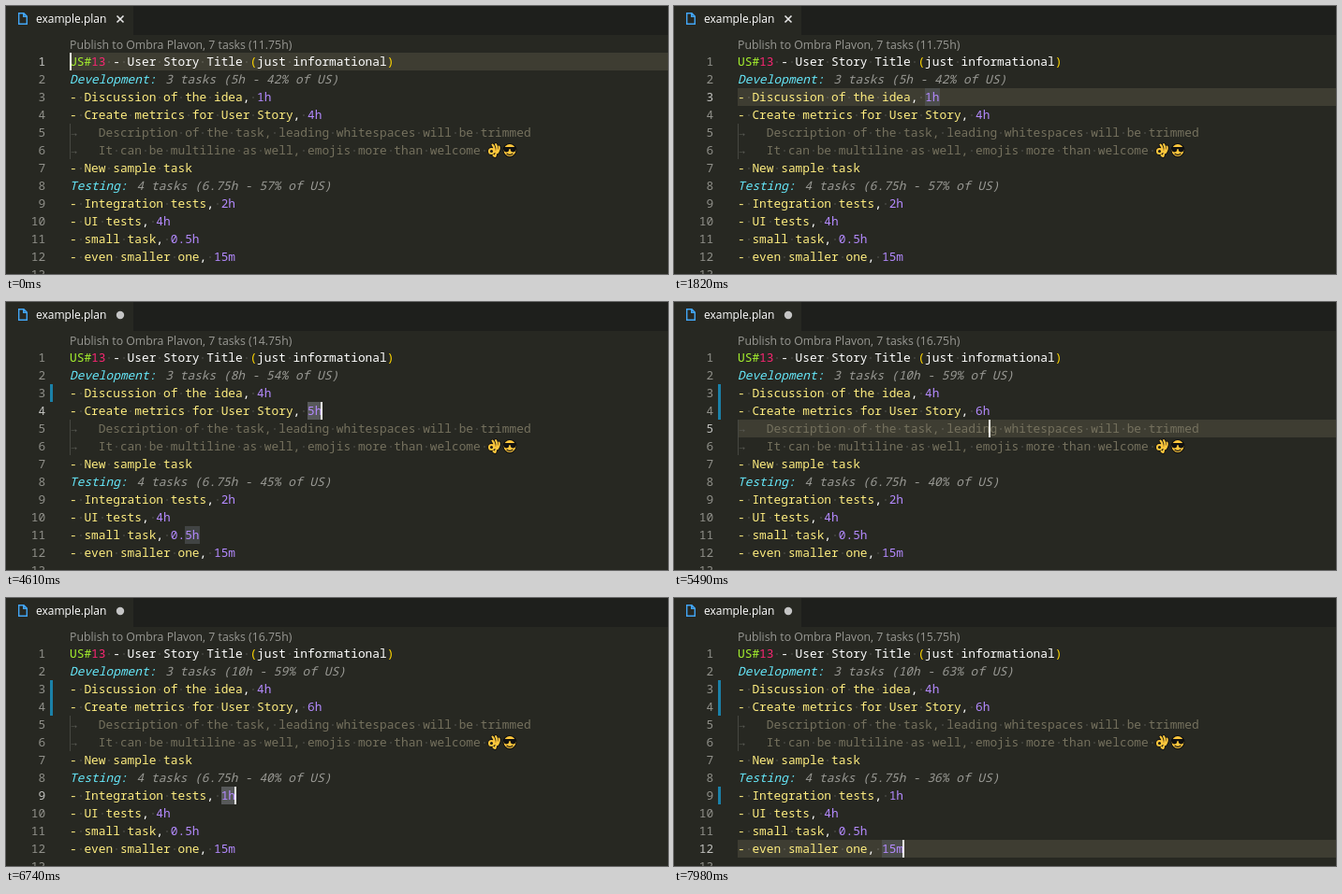
Write an HTML page with a canvas that moves like this. It is 707 by 287 pixels and loops after 8000 ms.

```html
<!DOCTYPE html>
<html lang="en">
<head>
<meta charset="utf-8">
<title>example.plan</title>
<style>
  html, body { margin: 0; width: 100%; height: 100%; overflow: hidden; background: #272822; }
  canvas { display: block; }
</style>
</head>
<body>
<canvas id="stage" width="707" height="287"></canvas>
<script>
const ctx = document.getElementById('stage').getContext('2d');
const LOOP = 8000, LEFT = 68, TOP = 50, CHAR = 7.697, ROW = 19;
const MONO = '12.83px "Noto Sans Mono", monospace';
const UI = '"Open Sans", "Noto Sans", sans-serif';
const COLOR = {
  back: '#272822', bar: '#1e1f1c', line: '#3e3d32', white: '#ffffff', yellow: '#ffee80',
  purple: '#b48aff', green: '#a6f22e', pink: '#f92672', cyan: '#66e8fa', gold: '#ffd700',
  note: '#75715e', hint: '#999994', space: 'rgba(255,255,255,.1)', guide: '#464741',
  arrow: '#5a5b55', modified: '#1b81a8', selection: '#57595a', word: 'rgba(87,91,97,.55)'
};

// row / want: caret line and preferred column; mark: highlighted word
const START = {
  row: 1, want: 0, caret: true, selecting: false, mark: '', dirty: false, changed: [],
  idea: 1, metrics: 4, integration: 2, dev: 5, test: 6.75, total: 11.75
};
const STEPS = [
  [500, { caret: false }],
  [620, { row: 2, caret: true }],
  [820, { row: 3 }],
  [1320, { want: 28 }],
  [1570, { mark: '1h' }],
  [1820, { caret: false }],
  [2250, { idea: 2, selecting: true, caret: true, mark: '2h' }],
  [2370, { idea: 3 }],
  [2440, { dirty: true }],
  [2620, { changed: [3], dev: 6 }],
  [2750, { dev: 7, caret: false }],
  [3000, { idea: 4 }],
  [3250, { total: 13.75, caret: true }],
  [3380, { dev: 8 }],
  [3430, { row: 4, selecting: false, mark: '' }],
  [3680, { mark: 'Story' }],
  [3750, { total: 14.75 }],
  [3820, { want: 35, mark: '' }],
  [4070, { mark: '4h' }],
  [4320, { caret: false }],
  [4610, { metrics: 5, selecting: true, caret: true, mark: '5h' }],
  [4740, { metrics: 6 }],
  [4990, { changed: [3, 4], dev: 9 }],
  [5120, { dev: 10, caret: false }],
  [5370, { row: 5, selecting: false, caret: true, mark: '' }],
  [5420, { total: 16.75 }],
  [5500, { row: 6 }],
  [5620, { row: 7 }],
  [5750, { row: 8 }],
  [5880, { row: 9 }],
  [6130, { mark: '2h' }],
  [6360, { caret: false }],
  [6740, { integration: 1, selecting: true, caret: true, mark: '' }],
  [6920, { changed: [3, 4, 9] }],
  [7050, { test: 5.75 }],
  [7230, { caret: false }],
  [7480, { row: 10, selecting: false, caret: true, total: 15.75 }],
  [7600, { row: 11 }],
  [7730, { row: 12 }],
  [7980, { mark: '15m' }]
];

const stateAt = time => Object.assign({}, START, ...STEPS.filter(s => s[0] <= time).map(s => s[1]));
const rowY = row => TOP + (row - 1) * ROW;
const colX = col => Math.round(LEFT + col * CHAR);

const documentLines = s => [
  'US#13 - User Story Title (just informational)',
  'Development:',
  `- Discussion of the idea, ${s.idea}h`,
  `- Create metrics for User Story, ${s.metrics}h`,
  '    Description of the task, leading whitespaces will be trimmed',
  '    It can be multiline as well, emojis more than welcome ',
  '- New sample task',
  'Testing:',
  `- Integration tests, ${s.integration}h`,
  '- UI tests, 4h',
  '- small task, 0.5h',
  '- even smaller one, 15m',
  ''
];

function fill(color, x, y, w, h) {
  ctx.fillStyle = color;
  ctx.fillRect(x, y, w, h);
}

function label(text, x, y, font, color) {
  ctx.font = `${font} ${UI}`;
  ctx.fillStyle = color;
  ctx.fillText(text, x, y);
}

function highlight(color, row, col, length) {
  fill(color, colX(col), rowY(row), colX(col + length) - colX(col), ROW);
}

// Places each character on the editor's column grid.
function code(text, row, col, colorAt, style = '') {
  ctx.font = `${style} ${MONO}`;
  [...text].forEach((char, i) => {
    ctx.fillStyle = colorAt(i, char);
    ctx.fillText(char, LEFT + (col + i) * CHAR, rowY(row) + 14);
  });
}

function colorsFor(text, row) {
  if (row === 1) {
    return (i, c) => i < 3 ? COLOR.green : i < 5 ? COLOR.pink : '()'.includes(c) ? COLOR.gold : COLOR.white;
  }
  if (text.endsWith(':')) return () => COLOR.cyan;
  if (text.startsWith(' ')) return () => COLOR.note;
  const comma = text.indexOf(',');
  return i => comma < 0 || i < comma ? COLOR.yellow : i === comma ? COLOR.white : COLOR.purple;
}

function drawLine(text, row) {
  const indented = text.startsWith(' ');
  const style = indented ? '' : text.endsWith(':') ? 'italic 500' : '500';
  code(text, row, 0, colorsFor(text, row), style);
  [...text].forEach((char, i) => {
    if (char === ' ' && !(indented && i < 4)) {
      fill(COLOR.space, colX(i + 0.5) - 1, rowY(row) + 9, 2, 2);
    }
  });
  if (indented) {
    fill(COLOR.guide, LEFT, rowY(row), 1, ROW);
    code('→', row, 0.1, () => COLOR.arrow);
  }
}

function summary(row, heading, tasks, hours, total) {
  const share = Math.floor(hours / total * 100);
  const margin = 10 / CHAR;
  code(`${tasks} tasks (${hours}h - ${share}% of US)`, row, heading.length + margin, () => COLOR.hint, 'italic');
}

function stroke(color, width, path) {
  ctx.strokeStyle = color;
  ctx.lineWidth = width;
  ctx.stroke(new Path2D(path));
}

function disc(color, x, y, r) {
  ctx.fillStyle = color;
  ctx.beginPath();
  ctx.arc(x, y, r, 0, 7);
  ctx.fill();
}

function drawTab(dirty) {
  fill(COLOR.bar, 0, 0, 707, 31);
  fill(COLOR.back, 0, 0, 136, 31);
  stroke('#42a5f5', 1.4, 'M13.7 7.7H19L22.3 11V19.3H13.7ZM18.7 8V11.3H22');
  label('example.plan', 32, 18, '500 12px', '#ffffff');
  if (dirty) disc('#c5c5c5', 122, 14, 4.2);
  else stroke('#e8e8e8', 1.6, 'M118.5 10.5L125.5 17.5M125.5 10.5L118.5 17.5');
}

function drawEmojis() {
  ctx.lineCap = ctx.lineJoin = 'round';
  const fingers = 'M522 156Q522 151 519.5 148.5M524 156Q525 151 523 148M525 157Q527.5 153 526.5 150.5';
  const palm = 'M524 156L522.5 161L520.5 160';
  const ring = 'M521 155.5A2.5 2.5 0 1 0 516 155.5A2.5 2.5 0 1 0 521 155.5';
  for (const [color, width] of [['#111111', 3.8], ['#ffc83d', 2]]) {
    stroke(color, width, fingers + palm + ring);
  }
  disc('#111111', 538, 154.5, 7.5);
  disc('#ffc83d', 538, 154.5, 6.4);
  ctx.fillStyle = '#111111';
  ctx.fill(new Path2D('M531 151H545V153Q544 156.5 541.5 156.5Q539 156.5 538.5 153H537.5Q537 156.5 534.5 156.5Q532 156.5 531 153Z'));
  stroke('#111111', 1.2, 'M535 158.3Q538 160.3 541 158.3');
  ctx.lineCap = 'butt';
  ctx.lineJoin = 'miter';
}

function drawCaret(col, row) {
  fill('#f8f8f0', Math.max(LEFT, colX(col) - 1), rowY(row), 2, ROW);
}

function draw(time) {
  const s = stateAt(time), lines = documentLines(s), current = lines[s.row - 1];
  fill(COLOR.back, 0, 0, 707, 287);
  drawTab(s.dirty);
  label(`Publish to Ombra Plavon, 7 tasks (${s.total}h)`, LEFT, 46, '12.3px', '#999994');

  if (s.selecting) {
    const start = current.lastIndexOf(' ') + 1;
    highlight(COLOR.selection, s.row, start, current.length - start);
  } else {
    fill(COLOR.line, LEFT, rowY(s.row), 707 - LEFT, ROW);
  }
  lines.forEach((text, i) => {
    const row = i + 1, at = s.mark ? text.indexOf(s.mark) : -1;
    if (at >= 0 && !(s.selecting && row === s.row)) {
      highlight(COLOR.word, row, at, s.mark.length);
    }
    const number = String(row);
    code(number, row, -3.35 - number.length, () => row === s.row ? '#c2c2bf' : '#90908a');
    drawLine(text, row);
  });
  s.changed.forEach(row => fill(COLOR.modified, 47, rowY(row), 3, ROW));
  summary(2, lines[1], 3, s.dev, s.dev + s.test);
  summary(8, lines[7], 4, s.test, s.dev + s.test);
  drawEmojis();
  if (s.caret) drawCaret(Math.min(s.want, current.length), s.row);
}

function tick() {
  draw(performance.now() % LOOP);
  requestAnimationFrame(tick);
}
tick();
</script>
</body>
</html>
```
